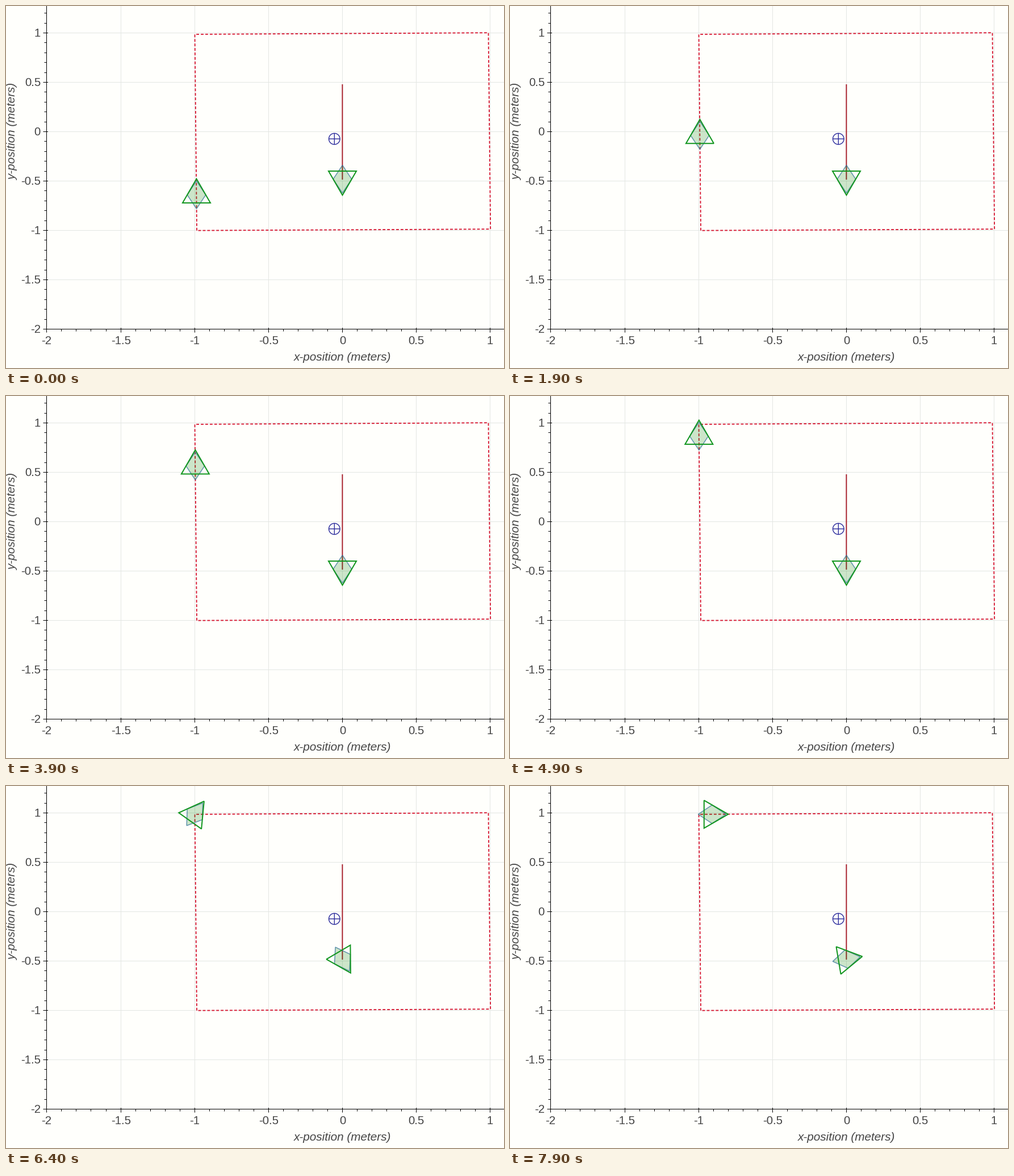
Animation of 877x638 px, one loop 8000 ms. Source, as a matplotlib script:

```python
import numpy as np
import matplotlib.pyplot as plt
from matplotlib.animation import FuncAnimation
from matplotlib.patches import Circle, Polygon

W, H, DPI = 877, 638, 100
PX = 72 / DPI                      # one pixel in points
INK, GREY = "#444444", "#e3e6e3"
R = 24.5                           # half the marker size

plt.rcParams["font.family"] = "Liberation Sans"
fig = plt.figure(figsize=(W / DPI, H / DPI), dpi=DPI, facecolor="#fffffc")
ax = fig.add_axes([0, 0, 1, 1])
ax.set_xlim(0, W)
ax.set_ylim(H, 0)
ax.axis("off")


def sx(v):
    """Pixel center of an x value."""
    return round(592 + 260.3 * v) + 0.5


def sy(v):
    return round(221 - 174 * v) + 0.5


def line(xs, ys, color, width=1, **kw):
    kw.setdefault("solid_capstyle", "butt")
    return ax.plot(xs, ys, color=color, lw=width * PX, snap=False, **kw)[0]


def label(x, y, text, size=20.4, **kw):
    ax.text(x, y, text, fontsize=size * PX, color=INK, va="baseline", **kw)


def draw_axes():
    left, base = 71.5, 569.5
    for v in np.arange(-2, 1.01, 0.5):
        x, y = sx(v), sy(v)
        if v > -2:
            line([x, x], [0, base], GREY, zorder=1)
            line([left, W], [y, y], GREY, zorder=1)
        line([x, x], [base - 2.5, base + 6], "black")
        line([left - 6, left + 2.5], [y, y], "black")
        label(x, 596, f"{v:g}", ha="center")
        label(61, y + 6.5, f"{v:g}", ha="right")
    for v in np.arange(-2, 1.21, 0.1):
        x, y = sx(v), sy(v)
        if x < W:
            line([x, x], [base, base + 4], "black")
        line([left - 4, left], [y, y], "black")
    line([left, left], [0, base + 0.5], "black")
    line([left, W], [base, base], "black")
    label(592.8, 625, "x-position (meters)", 20.8, style="italic", ha="center")
    label(17, 221.5, "y-position (meters)", 20.6, style="italic", ha="center",
          rotation=90, rotation_mode="anchor")


def draw_paths():
    line([336, 332.5, 849.5, 853.2, 336], [395.7, 49.9, 47.2, 393.2, 395.7],
         "#d6142f", 1.8, zorder=3, dashes=(2.7, 1.7), dash_capstyle="butt")
    line([592.4, 592.4], [138, 306], "#a51c28", 1.9, zorder=3)
    blue, cx, cy, r = "#2b2b9c", 578.3, 234.2, 9.8
    ax.add_patch(Circle((cx, cy), r, fill=False, ec=blue, lw=1.4 * PX, zorder=4))
    line([cx - r, cx + r], [cy, cy], blue, 1.4, zorder=4)
    line([cx, cx], [cy - r, cy + r], blue, 1.4, zorder=4)


def ring(center, heading, radii, turns):
    """Screen points around a center, at angles relative to the heading."""
    a = np.radians(heading + np.array(turns))
    r = np.array(radii)
    return np.column_stack([center[0] + r * np.cos(a), center[1] - r * np.sin(a)])


class Robot:
    def __init__(self):
        spot = np.zeros((3, 2))
        self.body = Polygon(spot, fc=(0, 0.5, 0, 0.2), ec=(0.2, 0.45, 0.6, 0.75),
                            lw=1.5 * PX, snap=False, zorder=5)
        self.arrow = Polygon(spot, fill=False, ec="#12961f", lw=2 * PX,
                             snap=False, zorder=6)
        ax.add_patch(self.body)
        ax.add_patch(self.arrow)

    def place(self, center, heading):
        self.body.set_xy(ring(center, heading, [R, R / 1.5] * 2, [0, 90, 180, 270]))
        self.arrow.set_xy(ring(center, heading, [R * 2 / 3 ** 0.5] * 3, [0, 120, 240]))


def walker_pose(k):
    if k >= 16:
        return (355.9, 49.8), 0
    if k >= 12:
        return (332.4, 49.9), 77.5 - 23 * (k - 12)
    y = 332.9 - 26.2 * min(k, 10)
    return (332.6 + (y - 49.9) * 0.0101, y), 90


def turner_pose(k):
    heading = -90 if k < 12 else -82.5 + 23 * (k - 12)
    return (592.5, 305.1), heading


draw_axes()
draw_paths()
walker, turner = Robot(), Robot()


def update(i):
    k = (i * 100 + 100) // 500     # the state advances twice a second
    walker.place(*walker_pose(k))
    turner.place(*turner_pose(k))
    return walker.body, walker.arrow, turner.body, turner.arrow


anim = FuncAnimation(fig, update, frames=80, interval=100, repeat=True,
                     repeat_delay=0, blit=False)
plt.show()
```
